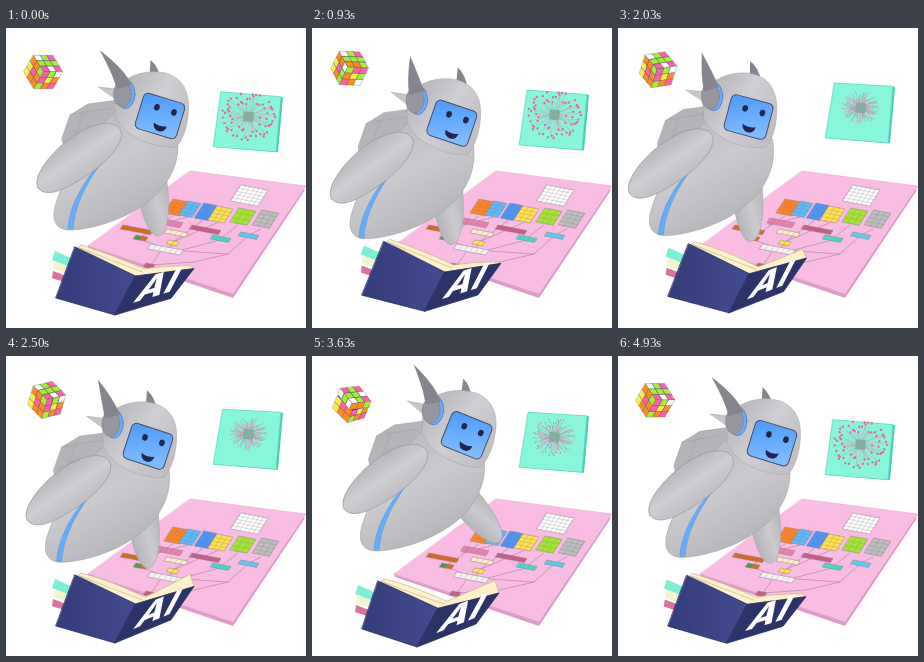
An HTML page that plays this animation: 300 px wide and 300 px high, repeating every 5010 ms.

```html
<!DOCTYPE html>
<html lang="en">
<head>
<meta charset="utf-8">
<title>Robot studying AI</title>
<style>
  html, body { margin: 0; width: 100%; height: 100%; overflow: hidden; background: #fff; }
  svg { display: block; width: 100vw; height: 100vh; }
  text { font: 800 39px Inter, "Liberation Sans", sans-serif; letter-spacing: 1px; fill: #fff; }
</style>
</head>
<body>
<svg viewBox="0 0 300 300" stroke-linejoin="round" stroke-linecap="round">
  <defs>
    <linearGradient id="shell" x1=".2" y1="0" x2=".75" y2="1">
      <stop offset="0" stop-color="#b4b4b9"/><stop offset=".45" stop-color="#cbcbcf"/><stop offset="1" stop-color="#adadb3"/>
    </linearGradient>
    <linearGradient id="limb" x1="0" y1="0" x2="0" y2="1">
      <stop offset="0" stop-color="#b6b6bb"/><stop offset=".5" stop-color="#cfcfd3"/><stop offset="1" stop-color="#bebec3"/>
    </linearGradient>
    <linearGradient id="helmet" x1="0" y1=".1" x2="1" y2=".8">
      <stop offset="0" stop-color="#b0b0b5"/><stop offset=".5" stop-color="#cfcfd3"/><stop offset="1" stop-color="#bdbdc2"/>
    </linearGradient>
    <linearGradient id="glass" x1=".2" y1="0" x2=".6" y2="1">
      <stop offset="0" stop-color="#4f9cfa"/><stop offset="1" stop-color="#80bcff"/>
    </linearGradient>
    <linearGradient id="cloth">
      <stop offset="0" stop-color="#343c7a"/><stop offset="1" stop-color="#434c90"/>
    </linearGradient>
  </defs>

  <g id="board">
    <path d="M184 147 299 162 227 270 83 221 82 218 300 158Z" fill="#de9bc8"/>
    <path d="M184 143 300 158 227 266 82 218Z" fill="#f9bde3" stroke="#e5a6d0" stroke-width=".5"/>
  </g>

  <path id="rightArm" fill="url(#shell)" stroke="#a2a2a9" stroke-width=".5"/>

  <g id="body" stroke="#a2a2a9" stroke-width=".6">
    <path d="M56 110 64 87 82 76 112 72 114 92 80 126 60 128Z" fill="#b3b3b8"/>
    <path d="M64 87 78 84 106 80M78 84 68 112" fill="none"/>
    <path d="M116 79C88 98 62 138 50 175C45 190 48 203 66 202C99 200 142 182 160 155C170 140 174 125 171 106Z" fill="url(#shell)"/>
    <path id="stripe" d="M102 126C83 146 64 172 62 201L67 201C69 174 84 149 102 126Z" fill="#65adfa" stroke="#5a9ae6"/>
  </g>

  <g id="head">
    <path id="rightHorn" fill="#85858e"/>
    <path d="M-46-18C-42-35-21-44-1-42C18-40 28-27 28-8C28 9 24 23 16 33C-5 35-34 24-45 4Z" fill="url(#helmet)" stroke="#a2a2a9" stroke-width=".5"/>
    <g transform="translate(-.5 2) rotate(17)" fill="#20264d">
      <rect x="-21.5" y="-18.5" width="43" height="37" rx="5" fill="url(#glass)" stroke="#464c66"/>
      <ellipse cx="-5.5" cy="-7.5" rx="2.8" ry="3.3"/>
      <ellipse cx="12.3" cy="-7.5" rx="2.8" ry="3.3"/>
      <path d="M-4 8Q3 11 9.5 8Q9 15 3 15Q-3 15-4 8Z"/>
    </g>
    <path d="M-62-27-44-25-38-10Z" fill="#c6c6ca" stroke="#a2a2a9" stroke-width=".5"/>
    <ellipse cx="-35" cy="-20" rx="9.5" ry="14.5" fill="#65adfa" stroke="#4a6ea0" stroke-width=".6"/>
    <ellipse cx="-38" cy="-20" rx="9" ry="13" fill="#96969e" stroke="#7c7c85" stroke-width=".5"/>
    <path id="leftHorn" fill="#85858e"/>
  </g>

  <path id="leftArm" fill="url(#limb)" stroke="#95959c" stroke-width=".6"/>

  <g id="book">
    <g id="tabs">
      <path d="M-20 4-2 12-5 20-23 13Z" fill="#7cf0d4"/>
      <path d="M-21 14-5 20-8 27-22 22Z" fill="#f3f5cf"/>
      <path d="M-22 24-9 29-11 35-23 31Z" fill="#d8749c"/>
    </g>
    <path id="pages" fill="#fdf1cb" stroke="#c8b689" stroke-width=".7"/>
    <path id="leftCover" fill="url(#cloth)" stroke="#262d60" stroke-width=".8"/>
    <path id="rightCover" fill="#2c3368" stroke="#262d60" stroke-width=".8"/>
    <text id="label" x="14" y="-9">AI</text>
  </g>

  <path id="panelEdge" fill="#4ccbb2"/>
  <path id="panelFace" fill="#88f6da" stroke="#5bd8c0" stroke-width=".7"/>
  <g id="net">
    <path id="twigs" fill="none" stroke="#d08cb0" stroke-width=".55"/>
    <path id="dots" fill="none" stroke="#ee62a4"/>
    <rect x="-5" y="-5" width="10" height="10" fill="#86ad9f"/>
  </g>

  <g id="cube" stroke="#6a6a78" stroke-width=".35"></g>
</svg>

<script>
const LOOP = 5010, STEPS = 100, { sin, cos, PI } = Math;
const $ = id => document.getElementById(id);
const set = (id, attr, value) => $(id).setAttribute(attr, value);
const draw = (id, d) => set(id, 'd', d);
const poly = pts => 'M' + pts.map(p => p.map(v => v.toFixed(2))).join('L') + 'Z';
const add = (a, x, y) => [a[0] + x, a[1] + y];
const clamp = v => Math.max(0, Math.min(1, v));
const ease = (n, a, b) => { const k = clamp((n - a) / (b - a)); return k * k * (3 - 2 * k); };
const pulse = (n, a, b, c, d) => ease(n, a, b) - ease(n, c, d);

function random(seed) {
  return () => (seed = (seed * 16807) % 2147483647) / 2147483647;
}

// Head poses: step, x, y, turn, yaw.
const POSES = [
  [0, 154.5, 86, 0, 0], [11, 147, 98, 3, .9], [27, 135, 88, 0, 1.1], [41, 131, 87, -2, 1],
  [61, 158, 90, 5, .1], [74, 155, 77, 5, .1], [85, 151.5, 76, 4, .1]
];

// Periodic smooth curve through one pose value, without overshoot.
function curve(k) {
  const c = POSES.length, at = i => POSES[(i + c) % c];
  const gap = i => (at(i + 1)[0] - at(i)[0] + STEPS) % STEPS;
  const rise = i => (at(i + 1)[k] - at(i)[k]) / gap(i);
  const slope = i => {
    const a = rise(i - 1), b = rise(i);
    return a * b > 0 ? 2 * a * b / (a + b) : 0;
  };
  return n => {
    let i = c - 1;
    while (at(i)[0] > n) i--;
    const h = gap(i), s = (n - at(i)[0]) / h, q = s * s, r = q * s, mix = 3 * q - 2 * r;
    return at(i)[k] * (1 - mix) + at(i + 1)[k] * mix
      + h * (slope(i) * (r - 2 * q + s) + slope(i + 1) * (r - q));
  };
}
const pose = [1, 2, 3, 4].map(curve);

function drawRobot(n) {
  const [x, y, turn, yaw] = pose.map(f => f(n));
  set('head', 'transform', `translate(${x} ${y}) rotate(${turn})`);
  const lx = -61 + 16 * yaw, rx = -10 + 13 * yaw;
  draw('leftHorn', `M${lx}-64Q-35-44-29-29L-44-25Q-47-39 ${lx}-64Z`);
  draw('rightHorn', `M${rx}-54q8 6 11 22l-12-4Z`);

  // The body follows the head loosely; the limbs hang on the body.
  const dx = .7 * (x - 154.5), dy = .8 * (y - 86) - .2 * (x - 154.5);
  set('body', 'transform', `translate(${dx} ${dy})`);
  set('stripe', 'transform', `translate(${-5 * yaw} 0)`);

  const swing = pulse(n, 18, 27, 27, 37), w = 20 - 3 * swing;
  draw('leftArm', `M-101 3C-100 ${-w * .6}-60 ${-w * 1.1}-35 ${-w}C-10 ${-w * .9} 0 ${-w * .4} 0 0
    C0 ${w * .6}-25 ${w}-50 ${w}C-75 ${w}-100 ${w * .9}-101 3Z`);
  set('leftArm', 'transform',
    `translate(${114 + dx - 4 * yaw - 10 * swing} ${101 + dy - 10 * swing}) rotate(${-34 - 54 * swing})`);

  const reach = pulse(n, 62, 82, 88, 99);
  const sx = 147 + dx + 9 * reach, sy = 150 + dy - 4 * reach;
  const ex = 152 + dx - 3 * yaw + 61 * reach - sx, ey = 208 + dy - 26 * reach - sy, l = Math.hypot(ex, ey);
  draw('rightArm', `M-14-12C${l * .5}-17 ${l}-11 ${l} 0C${l} 9 ${l * .5} 19-14 16Z`);
  set('rightArm', 'transform', `translate(${sx} ${sy}) rotate(${Math.atan2(ey, ex) * 180 / PI})`);
}

function drawBook(p) {
  const s = sin(p), c = cos(p + .4), lift = 7.5 - 6.5 * cos(p - .75);
  const leftTop = [69 + 3 * s, 219 - 6 * s], leftBase = [50, 270 - 3 * s];
  const spineTop = [129.5 + 3.5 * s, 248 - 4.3 * s], spineBase = [109 + 4 * s, 287 - 4 * s];
  const rightTop = [188 + s, 235.5 + 5.5 * c], rightBase = [165 + s, 267 + 3.5 * c];
  const fold = add(spineTop, 9, -7);
  draw('pages', `M${add(leftTop, 3, 0)}L${add(leftTop, 6, -2)}Q${add(leftTop, 34, 7 - lift * .2)} ${fold}
    Q${add(fold, 16, -2 - lift * .4)} ${add(rightTop, -4, -lift)}L${rightTop}L${spineTop}Z
    M${add(leftTop, 5, 1)}Q${add(leftTop, 38, 14)} ${add(fold, -2, 3)}`);
  draw('leftCover', poly([leftTop, spineTop, spineBase, leftBase]));
  draw('rightCover', poly([spineTop, rightTop, rightBase, spineBase]));
  set('tabs', 'transform', `translate(${leftTop})`);
  const along = (a, b, size) => [(b[0] - a[0]) / size, (b[1] - a[1]) / size];
  set('label', 'transform',
    `matrix(${[...along(spineBase, rightBase, 60), ...along(spineTop, spineBase, 43), ...spineBase]})`);
}

const rnd = random(41);
const twigs = Array.from({ length: 64 }, (_, i) => {
  const a = i * 2.39996;
  return { a, r: 11 + 16 * Math.sqrt(rnd()), bend: a + (rnd() - .5) * .7 };
});
const polar = (a, r) => `${(cos(a) * r * 1.03).toFixed(2)} ${(sin(a) * r * .88).toFixed(2)}`;

function drawPanel(n, p) {
  const c = cos(p - .3), y = 58.5 + 5.5 * c;
  const q = [[216 - c, y], [275, y + 4 + c], [270, y + 60], [207.5, y + 55]];
  draw('panelFace', poly(q));
  draw('panelEdge', poly([q[0], add(q[1], 2, .5), add(q[2], 2, .5), q[3]]));
  set('net', 'transform', `matrix(1 .08 -.08 1 242.5 ${y + 25})`);

  const bloom = 1 - pulse(n, 18, 38, 62, 92);
  let lines = '', dots = '';
  for (const t of twigs) {
    const r = t.r * (.7 + .3 * bloom);
    lines += `M${polar(t.bend, 4)}Q${polar(t.bend, r * .6)} ${polar(t.a, r)}`;
    // The left side blooms first.
    if (bloom * 1.5 - .25 * cos(t.a) > .35) dots += `M${polar(t.a, r)}h.01`;
  }
  draw('twigs', lines);
  draw('dots', dots);
  set('dots', 'stroke-width', .6 + 1.7 * bloom);
  set('twigs', 'stroke-opacity', 1 - .5 * bloom);
}

const PAINT = ['#ffffff', '#ff8a22', '#a4ee35', '#ff5fa6', '#ffea4d'];
const pick = random(20251);
const stickers = Array.from({ length: 162 }, () => PAINT[Math.floor(pick() * PAINT.length)]);
const rotate = (p, axis, angle) => {
  const r = [...p], i = (axis + 1) % 3, j = (axis + 2) % 3, c = cos(angle), s = sin(angle);
  r[i] = p[i] * c - p[j] * s;
  r[j] = p[i] * s + p[j] * c;
  return r;
};

function drawCube(n, p) {
  const cx = 39 - 2 * cos(p - .4), cy = 44 - 4 * sin(p), size = 7.9;
  const side = PI / 2 * pulse(n, 5, 17, 21, 33), top = PI / 2 * pulse(n, 65, 75, 80, 90);
  const view = (v, cell) => {
    if (cell[0] === 1) v = rotate(v, 0, side);
    if (cell[1] === -1) v = rotate(v, 1, top);
    return rotate(rotate(rotate(v, 1, -.78 - .15 * sin(p)), 0, -.6), 2, .4 + .12 * cos(p));
  };
  const faces = [];
  for (let k = 0; k < 27; k++) {
    const cell = [k % 3 - 1, Math.floor(k / 3) % 3 - 1, Math.floor(k / 9) - 1];
    for (let f = 0; f < 6; f++) {
      const axis = f >> 1, sign = f % 2 ? 1 : -1, normal = [0, 0, 0];
      normal[axis] = sign;
      if (view(normal, cell)[2] <= 0) continue;
      const corner = (a, b) => {
        const v = [...cell];
        v[axis] += sign * .5;
        v[(axis + 1) % 3] += a;
        v[(axis + 2) % 3] += b;
        return view(v, cell);
      };
      const pts = [corner(-.5, -.5), corner(.5, -.5), corner(.5, .5), corner(-.5, .5)];
      faces.push({
        z: pts.reduce((s, v) => s + v[2], 0),
        d: poly(pts.map(v => [cx + v[0] * size, cy + v[1] * size])),
        fill: cell[axis] === sign ? stickers[k * 6 + f] : '#2a2c55'
      });
    }
  }
  faces.sort((a, b) => a.z - b.z);
  $('cube').innerHTML = faces.map(f => `<path d="${f.d}" fill="${f.fill}"/>`).join('');
}

function buildBoard() {
  const card = (x, y, w, h, color, cols = 1, rows = 1) => {
    let d = '';
    for (let i = 1; i < cols; i++) d += `M${w * i / cols} 0v${h}`;
    for (let i = 1; i < rows; i++) d += `M0 ${h * i / rows}h${w}`;
    return `<g transform="matrix(1 .19 -.64 1 ${x} ${y})" stroke="#8d7f8d" stroke-width=".4">
      <rect width="${w}" height="${h}" fill="${color}"/><path d="${d}" opacity=".6"/></g>`;
  };
  const wires = ['167 188 135 209', '182 189 150 197', '197 192 167 214', '211 195 167 214', '232 197 214 211',
    '255 201 243 207 222 226 178 223', '214 212 176 222', '135 211 157 220 145 237 188 234 222 226', '168 216 160 221'];
  $('board').innerHTML += `<path d="M${wires.join('M')}" fill="none" stroke="#a3849b" stroke-width=".6"/>`
    + card(235, 157, 27, 16, '#fff', 6, 5)
    + card(167, 171, 16, 14, '#ff8420', 3, 4)
    + card(182, 173, 13, 14, '#5ab9f7', 2, 4)
    + card(198, 175, 13, 15, '#4a95f5', 2, 4)
    + card(211, 178, 16, 14, '#ffe24a', 3, 4)
    + card(233, 180, 17, 14, '#a1e32f', 3, 3)
    + card(256, 182, 17, 15, '#bcbcbc', 3, 4)
    + card(152, 190, 25, 5, '#e680ae', 5, 1)
    + card(117, 197, 30, 4, '#d66a20', 5)
    + card(161, 201, 21, 4, '#fbeec6', 4)
    + card(186, 197, 29, 4, '#c65e86')
    + card(207, 207, 18, 4, '#46d6c5')
    + card(235, 204, 18, 4, '#5cc8ee')
    + card(130, 207, 6, 4, '#4f9a48') + card(136, 208, 6, 4, '#d66a20')
    + card(163, 212, 10, 4, '#ffe24a', 2)
    + card(145, 216, 32, 5, '#f4f1f2', 6)
    + card(140, 235, 9, 4, '#c65e86');
}

let shown = -1;
function tick() {
  const t = performance.now() % LOOP;
  // Poses alternate between 30 ms and 70 ms on screen.
  const n = Math.min(STEPS - 1, 2 * Math.floor(t / 100) + (t % 100 >= 30 ? 1 : 0));
  if (n !== shown) {
    const phase = 2 * PI * n / STEPS;
    shown = n;
    drawRobot(n);
    drawBook(phase);
    drawPanel(n, phase);
    drawCube(n, phase);
  }
  requestAnimationFrame(tick);
}
buildBoard();
tick();
</script>
</body>
</html>
```
